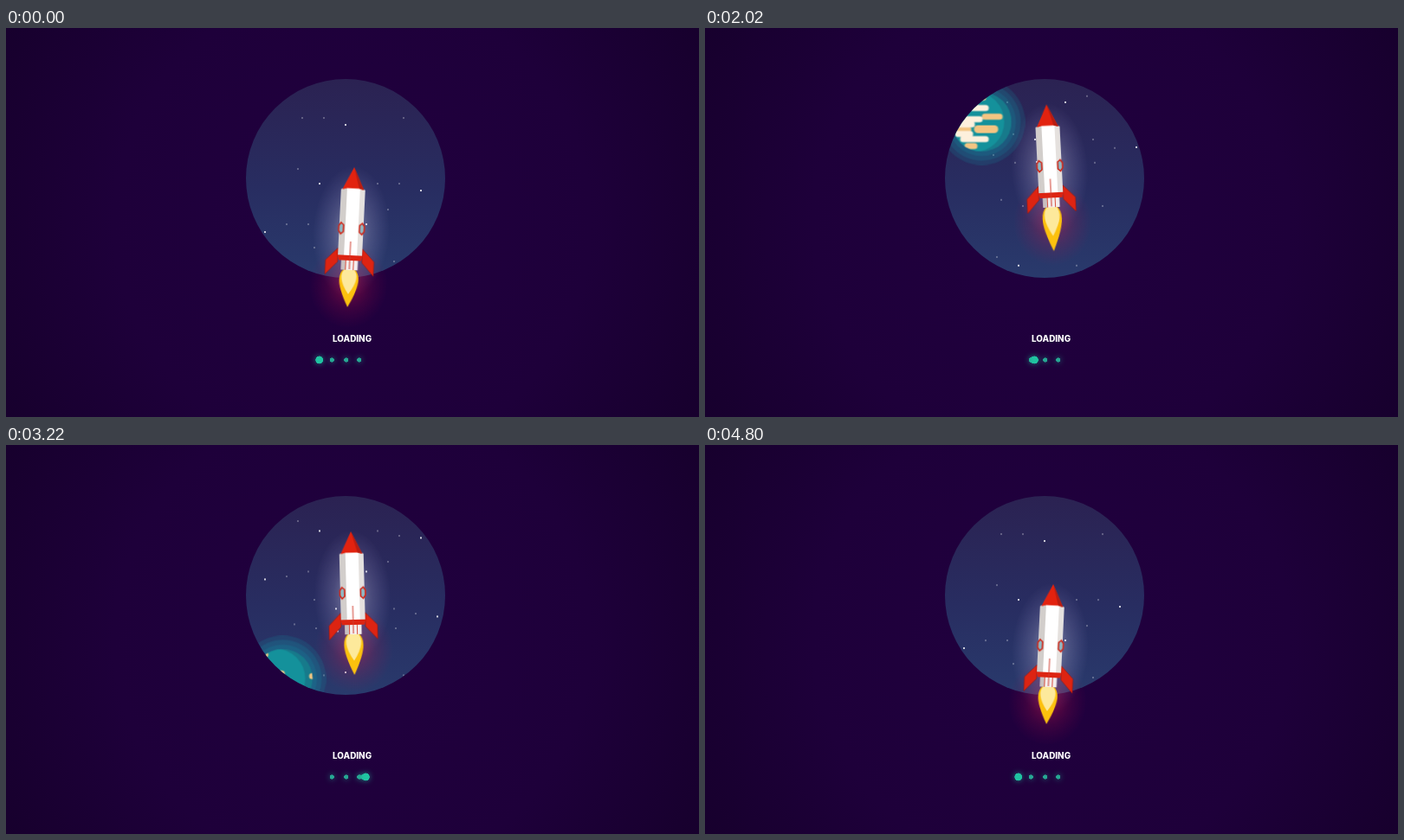
These frames come from a looping animation (800 by 450 pixels, 4820 ms). An HTML page without scripts:

```html
<!DOCTYPE html>
<html lang="en">
<head>
<meta charset="utf-8">
<title>Loading</title>
<style>
  html, body { margin: 0; width: 100%; height: 100%; overflow: hidden; background: #1d0039; }
  svg { display: block; width: 100vw; height: 100vh; }

  .slow, .fast, .planet, .clouds, .sway, .rise, .tilt, .flame {
    animation: 4820ms linear infinite;
  }
  .slow { animation-name: slow; }
  .fast { animation-name: fast; }
  .planet { animation-name: planet; }
  .clouds { animation-name: clouds; }
  .sway { animation-name: sway; }
  .rise { animation-name: rise; }
  .tilt { animation-name: tilt; }
  .flame { animation-name: flame; }
  .runner { animation: run 2410ms cubic-bezier(.37, 0, .63, 1) infinite; }

  @keyframes slow { to { transform: translateY(226px); } }
  @keyframes fast { to { transform: translateY(243px); } }
  @keyframes planet { from { transform: translateY(-337px); } to { transform: translateY(313px); } }
  @keyframes clouds { from { transform: translateX(45px); } to { transform: translateX(-42px); } }

  @keyframes rise {
    0%, 100% { transform: translateY(161px); animation-timing-function: cubic-bezier(.333, 0, .667, .49); }
    17.43% { transform: translateY(138px); animation-timing-function: cubic-bezier(.333, .29, .667, .71); }
    30.29% { transform: translateY(108px); animation-timing-function: cubic-bezier(.333, .56, .667, 1); }
    51.87% { transform: translateY(82px); animation-timing-function: cubic-bezier(.333, 0, .667, .52); }
    66.8% { transform: translateY(100px); animation-timing-function: cubic-bezier(.333, .31, .667, .63); }
    80.08% { transform: translateY(125px); animation-timing-function: cubic-bezier(.333, .38, .667, 1); }
  }
  @keyframes sway {
    0%, 100% { transform: translateX(398.4px); }
    17.43% { transform: translateX(398px); animation-timing-function: cubic-bezier(.333, .2, .667, 1); }
    30.29% { transform: translateX(404.8px); animation-timing-function: cubic-bezier(.37, 0, .63, 1); }
    51.87% { transform: translateX(392.6px); animation-timing-function: cubic-bezier(.333, 0, .667, .73); }
    66.8% { transform: translateX(400px); animation-timing-function: cubic-bezier(.333, .5, .667, 1); }
    80.08% { transform: translateX(403.7px); animation-timing-function: cubic-bezier(.37, 0, .63, 1); }
  }
  @keyframes tilt {
    0%, 100% { transform: rotate(2.8deg); animation-timing-function: cubic-bezier(.333, 0, .667, .6); }
    17.43% { transform: rotate(0); animation-timing-function: cubic-bezier(.333, .35, .667, .8); }
    30.29% { transform: rotate(-2.4deg); animation-timing-function: cubic-bezier(.333, .8, .667, 1); }
    51.87% { transform: rotate(-3deg); animation-timing-function: cubic-bezier(.333, 0, .667, .55); }
    66.8% { transform: rotate(-1.5deg); }
    80.08% { transform: rotate(1.1deg); animation-timing-function: cubic-bezier(.333, .6, .667, 1); }
  }
  @keyframes flame {
    0%, 100% { transform: scaleY(1); }
    17.43% { transform: scaleY(.93); }
    30.29% { transform: scaleY(1.07); }
    51.87% { transform: scaleY(1.27); }
    66.8% { transform: scaleY(1.09); }
    80.08% { transform: scaleY(.96); }
  }
  @keyframes run {
    0%, 100% { transform: translateX(361.7px); }
    42.7%, 57.3% { transform: translateX(421.6px); }
  }

  .star { fill: none; stroke: #fff; stroke-linecap: round; }
  .small { stroke-width: 1.3; opacity: .8; }
  .large { stroke-width: 2.1; }
  .cream { stroke: #fdf0dc; }
  .tan { stroke: #f4c582; }
  .caption { font: 800 9.9px Inter, sans-serif; fill: #fff; text-anchor: middle; }
  .glow { filter: drop-shadow(0 0 3px rgba(32, 196, 162, .65)); }
</style>
</head>
<body>
<svg viewBox="0 0 800 450" preserveAspectRatio="none">
  <defs>
    <radialGradient id="backdrop" gradientUnits="userSpaceOnUse" cx="400" cy="225" r="460">
      <stop offset="0" stop-color="#21003f"/>
      <stop offset=".6" stop-color="#1e003a"/>
      <stop offset="1" stop-color="#17002d"/>
    </radialGradient>
    <linearGradient id="sky" x2="0" y2="1">
      <stop offset="0" stop-color="#2b2252"/>
      <stop offset=".55" stop-color="#282d61"/>
      <stop offset="1" stop-color="#293a6c"/>
    </linearGradient>
    <radialGradient id="shine">
      <stop offset="0" stop-color="#fff" stop-opacity=".42"/>
      <stop offset=".5" stop-color="#e8dcff" stop-opacity=".17"/>
      <stop offset="1" stop-color="#cbbcff" stop-opacity="0"/>
    </radialGradient>
    <radialGradient id="heat">
      <stop offset="0" stop-color="#f0204a" stop-opacity=".42"/>
      <stop offset=".55" stop-color="#d0104a" stop-opacity=".16"/>
      <stop offset="1" stop-color="#b00048" stop-opacity="0"/>
    </radialGradient>
    <clipPath id="porthole"><circle cx="392" cy="174" r="115"/></clipPath>
    <clipPath id="globe"><circle r="34.5"/></clipPath>
    <filter id="goo" filterUnits="userSpaceOnUse" x="340" y="365" width="110" height="38" color-interpolation-filters="sRGB">
      <feGaussianBlur stdDeviation="1.7"/>
      <feColorMatrix values="1 0 0 0 0  0 1 0 0 0  0 0 1 0 0  0 0 0 9 -4"/>
    </filter>

    <g id="starsA" class="star">
      <path class="small" d="M342 104h0M429 180h0M349 227h0M448 270h0M358 61h0M450 61h0"/>
      <path class="large" d="M392 112h0M362 180h0M479 188h0M299 236h0M416 227h0M381 270h0M498 279h0"/>
    </g>
    <g id="starsB" class="star">
      <path class="small" d="M337 163h0M367 104h0M459 104h0M454 180h0M324 227h0M441 210h0M356 254h0M473 270h0M333 45h0"/>
      <path class="large" d="M383 53h0"/>
    </g>
    <path id="fin" d="M-14 94L-28 108.500V125L-14 110z"/>
    <path id="window" d="M-1-6.500L2-4V4L-1 6.500L-3.500 3V-3z" fill="#8fb9c4" stroke="#cf2416" stroke-width="1.600"/>
  </defs>

  <rect width="800" height="450" fill="url(#backdrop)"/>
  <circle cx="392" cy="174" r="115" fill="url(#sky)"/>

  <g clip-path="url(#porthole)">
    <g class="slow"><use href="#starsA"/><use href="#starsB" y="-226"/></g>
    <g class="fast"><use href="#starsB"/><use href="#starsA" y="-243"/></g>
    <g class="planet">
      <g transform="translate(319.500 173)">
        <g fill="#12a0ae" fill-opacity=".16">
          <circle r="50"/><circle r="45"/><circle r="39.500"/>
        </g>
        <g clip-path="url(#globe)">
          <circle r="34.500" fill="#177a8b"/>
          <circle cx="-9" r="35" fill="#14919b"/>
          <g class="clouds" fill="none" stroke-linecap="round" stroke-width="7">
            <path class="tan" d="M-19-28H-7M-36-17H-24M-5-6H12M-36 9H-24M-25 28H-17M47-3H66"/>
            <path class="cream" d="M-36-22H-16M-20-16H-4M-38-3H-11M-40 3H-20M-36 14H-22M-30 20H-4"/>
            <path class="tan" stroke-width="9" d="M-13 8.500H6"/>
          </g>
        </g>
      </g>
    </g>
  </g>

  <g class="sway"><g class="rise">
    <!-- pivot sits mid-hull so the tilt swings both ends -->
    <g transform="translate(0 75)"><g class="tilt"><g transform="translate(0 -75)">
      <ellipse cy="75" rx="44" ry="76" fill="url(#shine)"/>
      <ellipse cy="136" rx="45" ry="50" fill="url(#heat)"/>

      <g transform="translate(0 118)"><g class="flame">
        <path d="M-6 0C-14 7-13 19 0 44C13 19 14 7 6 0z" fill="#fcc10e"/>
        <path d="M-5 0C-11 6-10 15 0 29C10 15 11 6 5 0z" fill="#fde99b"/>
      </g></g>

      <path d="M-9.500 106H9.500V119H-9.500z" fill="#f4eeee"/>
      <path d="M-9.500 106H-5V119H-9.500z" fill="#c9c0c0"/>
      <path d="M-4.500 107V119M4.500 107V119" stroke="#d8503f"/>
      <g fill="#dd2412" stroke="#8d1610" stroke-width=".6">
        <use href="#fin"/><use href="#fin" transform="scale(-1 1)"/>
      </g>
      <path d="M-13.700 26L-7 23H7L13.700 26V103H-13.700z" fill="#fff"/>
      <path d="M-13.700 26L-7 23V103H-13.700z" fill="#d2cecb"/>
      <path d="M8 23.500L13.700 26V103H8z" fill="#e5e1de"/>
      <path d="M0 0L-12.500 26L-7 24.500H7L12.500 26z" fill="#e2220f"/>
      <path d="M0 0L7 24.500L12.500 26z" fill="#b81c10"/>
      <path d="M-14.500 102H14.500L13 108H-13z" fill="#dd2412"/>
      <path d="M0 86V118" stroke="#cf3a2c"/>
      <use href="#window" x="-11" y="71"/>
      <use href="#window" transform="translate(11.500 71) scale(-1 1)"/>
    </g></g></g>
  </g></g>

  <text class="caption" x="399.600" y="363">LOADING</text>
  <g class="glow"><g filter="url(#goo)">
    <g fill="#27a793">
      <circle cx="376.300" cy="384" r="2.900"/><circle cx="392.700" cy="384" r="2.900"/><circle cx="407.700" cy="384" r="2.900"/>
    </g>
    <circle class="runner" cy="384" r="4.700" fill="#20c3a1"/>
  </g></g>
</svg>
</body>
</html>
```
